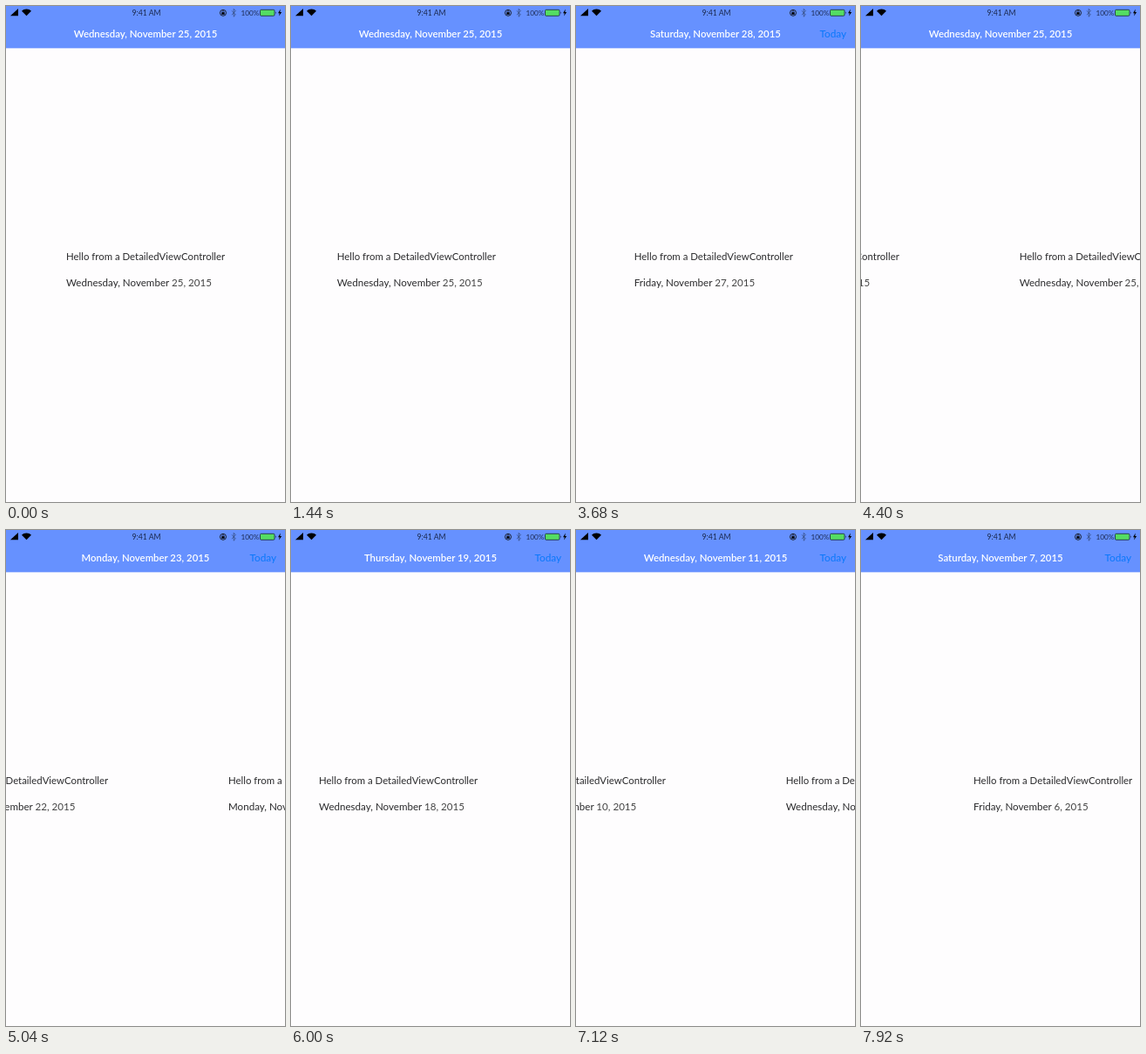
Recreate the animation shown at these times as an HTML page. Size 320 px wide and 568 px high, loop 8000 ms.

```html
<!DOCTYPE html>
<html lang="en">
<head>
<meta charset="utf-8">
<title>Day pager</title>
<style>
  html, body { margin: 0; width: 100%; height: 100%; overflow: hidden; background: #fefdfe; }
  svg { display: block; width: 100vw; height: 100vh; }
  text { font: 11.4px Lato, "Open Sans", sans-serif; white-space: pre; fill: #2a2a2c; }
  .date { font-size: 11.6px; }
  .number { fill: #444; }
  .status { fill: #1c2a50; }
  #title { font-weight: 600; fill: #fff; text-anchor: middle; }
  #today { font-size: 11.8px; fill: #0a78fb; }
</style>
</head>
<body>
<svg viewBox="0 0 320 568">
  <rect width="320" height="568" fill="#fefdfe"/>
  <g class="page">
    <text x="69" y="290.5">Hello from a DetailedViewController</text>
    <text class="date" x="69" y="320.5"><tspan class="day"></tspan><tspan class="number"></tspan></text>
  </g>
  <g class="page">
    <text x="69" y="290.5">Hello from a DetailedViewController</text>
    <text class="date" x="69" y="320.5"><tspan class="day"></tspan><tspan class="number"></tspan></text>
  </g>

  <rect width="320" height="48.35" fill="#6691ff"/>
  <text id="title" x="160" y="36"></text>
  <text id="today" x="279.5" y="36">Today</text>

  <!-- Signal and Wi-Fi -->
  <path d="M5 11.3L14 3V11.3Z"/>
  <path d="M18 5.8C21 2.6 26 2.6 29 5.8L23.5 11.3Z"/>
  <text class="status" x="144.5" y="11" style="font-size:8.7px">9:41 AM</text>
  <!-- Rotation lock -->
  <circle cx="249" cy="7.8" r="3.5" fill="none" stroke="#111" stroke-width=".9"/>
  <rect x="247.3" y="7.2" width="3.4" height="2.6"/>
  <path d="M248 7.4V6.5a1 1 0 0 1 2 0V7.4" fill="none" stroke="#111" stroke-width=".7"/>
  <!-- Bluetooth -->
  <path d="M259 5.4L263.4 10L261.2 12.2V3.4L263.4 5.6L259 10.2" fill="none" stroke="#31466f" stroke-width=".7"/>
  <text class="status" x="269.5" y="11" style="font-size:8.2px">100%</text>
  <!-- Battery -->
  <rect x="291.5" y="4.3" width="16.5" height="7" rx="1.2" fill="#54dc62" stroke="#182338" stroke-width=".8"/>
  <path d="M309 6.5q1.2 1.3 0 2.6Z"/>
  <path d="M314.8 3.6L312 8.2H313.8L313 11.6L316.2 6.9H314.3Z"/>
</svg>
<script>
const LOOP = 8000, STEP = 80, WIDTH = 320, TITLE_LAG = 60, TODAY = 25;
// [time in ms, day of month]; each day crossed is one swipe
const swipes = [
  [0, 25], [1380, 25], [1820, 26], [2260, 27], [2740, 28], [3450, 28],
  [3692, 27], [4872, 23], [5175, 22], [5825, 19], [6047, 18],
  [7045, 11], [7188, 10], [7707, 7], [7874, 6], [8040, 5]
];
const FORWARD_END = 3450;
const pages = [...document.querySelectorAll(".page")];
const title = document.getElementById("title");
const today = document.getElementById("today");

const dateText = day => new Date(Date.UTC(2015, 10, day)).toLocaleDateString("en-US", {
  weekday: "long", month: "long", day: "numeric", year: "numeric", timeZone: "UTC"
});

function positionAt(time) {
  const next = swipes.findIndex(([end]) => end > time);
  const [t0, d0] = swipes[next - 1], [t1, d1] = swipes[next];
  const linear = d0 + (d1 - d0) * (time - t0) / (t1 - t0);
  const base = Math.floor(linear), u = linear - base;
  return base + u * u * (3 - 2 * u);
}

function draw(time) {
  const position = positionAt(time), first = Math.floor(position);
  pages.forEach((page, i) => {
    const day = first + i, [, name, number] = dateText(day).match(/^(\D+)(.+)$/);
    page.querySelector(".day").textContent = name;
    page.querySelector(".number").textContent = number;
    page.setAttribute("transform", `translate(${(day - position) * WIDTH} 0)`);
  });
  // The title only changes once a swipe has settled
  const settled = positionAt(Math.max(0, time - TITLE_LAG));
  const shown = time < FORWARD_END ? Math.floor(settled) : Math.ceil(settled);
  title.textContent = dateText(shown);
  today.style.visibility = shown === TODAY ? "hidden" : "visible";
}

const start = performance.now();
function tick() {
  const time = (performance.now() - start) % LOOP;
  draw(Math.floor(time / STEP) * STEP);
  requestAnimationFrame(tick);
}
tick();
</script>
</body>
</html>
```
